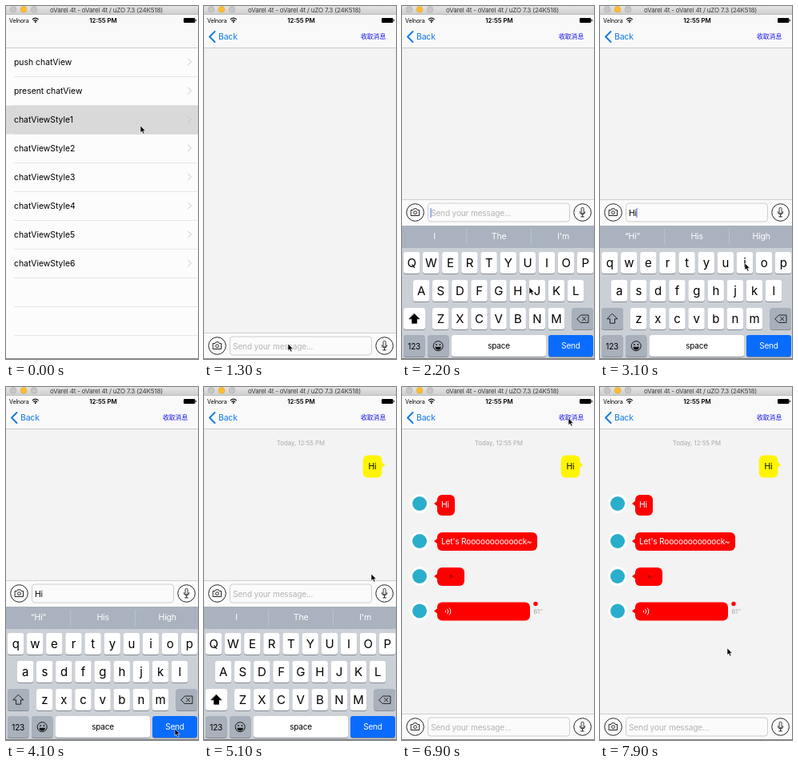
An HTML page that plays this animation: 240 px wide and 442 px high, repeating every 8000 ms.

```html
<!DOCTYPE html>
<html lang="en">
<head>
<meta charset="utf-8">
<title>Chat view demo</title>
<style>
  html, body { margin: 0; width: 100%; height: 100%; overflow: hidden; background: #f3f3f3; }
  svg { display: block; width: 240px; height: 442px; }
  text { font: 10.4px Inter, Roboto, sans-serif; letter-spacing: -.02em; white-space: pre; }
  .wide text { letter-spacing: 0; }
  .bold text { font-weight: 600; }
  .mid { text-anchor: middle; }
  .line { fill: none; stroke: #222; stroke-width: 1; stroke-linecap: round; stroke-linejoin: round; }
</style>
</head>
<body>
<svg id="stage" viewBox="0 0 240 442"></svg>
<script>
const SEND_AT = 4400, REPLY_AT = 6400, LOOP = 8000;
const stage = document.getElementById('stage');
const $ = id => document.getElementById(id);

const rect = (x, y, w, h, fill, r = 0, extra = '') =>
  `<rect x="${x}" y="${y}" width="${w}" height="${h}" rx="${r}" fill="${fill}" ${extra}/>`;
const text = (x, y, str, fill = '#000', size = 10.4, extra = '') =>
  `<text x="${x}" y="${y}" fill="${fill}" style="font-size:${size}px" ${extra}>${str}</text>`;
const mid = (x, y, str, fill, size, extra = '') => text(x, y, str, fill, size, 'class="mid" ' + extra);
const line = (d, extra = '') => `<path class="line" d="${d}" ${extra}/>`;
const circle = (x, y, r, fill, extra = '') => `<circle cx="${x}" cy="${y}" r="${r}" fill="${fill}" ${extra}/>`;
const group = (cls, body) => `<g class="${cls}">${body}</g>`;

function listPage() {
  const names = ['push chatView', 'present chatView'];
  for (let i = 1; i <= 6; i++) names.push('chatViewStyle' + i);
  let s = rect(0, 52, 240, 390, '#fcfcfc') + rect(0, 124.5, 240, 36, '#d9d9d9');
  for (let i = 0; i < 10; i++) {
    const y = 52.5 + 36 * i;
    s += rect(10, y + 35.7, 230, .6, '#d8d8da');
    if (names[i]) {
      s += text(10, y + 21.7, names[i]);
      s += line(`M227.5 ${y + 13.5}l4 4l-4 4`, 'style="stroke:#c4c4c8"');
    }
  }
  return s;
}

function bubble(x, y, w, h, fill, right) {
  const tail = right
    ? `M${x + w - 1} ${y + 8}l5 4l-5 4z`
    : `M${x + 1} ${y + 7}l-5 4l5 4z`;
  return rect(x, y, w, h, fill, 6) + `<path d="${tail}" fill="${fill}"/>`;
}

function messages() {
  const sent = group('wide', mid(121, 72.5, 'Today, 12:55 PM', '#a9a9a9', 7.8)) +
    bubble(198.7, 85.6, 23.6, 27.8, '#fff500', true) + mid(210.5, 103.3, 'Hi');
  const boxes = [[135, 22, 26], [182, 125, 23], [226, 34, 23], [269.5, 116, 23]];
  let reply = '';
  for (const [y, w, h] of boxes)
    reply += circle(22, y + 11, 12, '#fff') + circle(22, y + 11, 9, '#2aaecb') + bubble(44, y, w, h, '#f00');
  reply += text(49, 151.3, 'Hi', '#fff') +
    text(49, 197, `Let's R${'o'.repeat(11)}ck~`, '#fff', 10.2) +
    '<path d="M60 234.5l4.5 3l-4.5 3z" fill="#b30000"/>' +
    line('M54.5 280a1.5 1.5 0 0 1 0 2M56.8 278.3a4 4 0 0 1 0 5.4M59.3 276.8a6 6 0 0 1 0 8.4', 'style="stroke:#fff"') +
    circle(167, 271.5, 2.7, '#f00') + text(164.5, 284, "61''", '#a5a5a5', 7.6);
  return `<g id="sent">${sent}</g><g id="reply">${reply}</g>`;
}

function inputBar() {
  const ring = x => circle(x, 425.5, 10.8, '#fcfcfc', 'stroke="#222"');
  return rect(0, 409.5, 240, 33, '#fafafa') + rect(0, 409, 240, .8, '#c6c6c6') +
    ring(16.5) + line('M11.5 422.5h2.3l1-1.7h3.4l1 1.7h2.3v7h-10z') + circle(16.5, 425.7, 1.9, 'none', 'stroke="#222"') +
    ring(225.6) + rect(224.1, 419.3, 3, 7.4, 'none', 1.5, 'stroke="#222" stroke-width=".9"') +
    line('M222.4 424.7a3.2 3.2 0 0 0 6.4 0M225.6 428.2v2.4M223.8 430.9h3.6') +
    rect(32.5, 414, 177, 23, '#fbfbfb', 3.5, 'stroke="#cdcdcd"') +
    text(36, 429.5, 'Send your message...', '#b4b4b8', 10.2, 'id="hint"') +
    text(36, 429.5, '', '#000', 10.4, 'id="typed"') +
    rect(35.5, 420, 1, 12, '#4a72d8', 0, 'id="caret"');
}

function keyboard() {
  const key = (x, y, w, fill, extra) =>
    rect(x, y + 1, w, 27, '#868b92', 3.2) + rect(x, y, w, 27, fill, 3.2, extra);
  const grey = '#a8b0bb';
  let s = rect(0, 442, 240, 170, '#cbd0d7') + rect(0, 442, 240, 28, '#a9b2be');
  for (let i = 0; i < 3; i++) {
    s += mid(40.5 + 80.6 * i, 458.6, '', '#fff', 10.6, `id="word${i}"`);
    if (i) s += rect(80.5 * i, 446, .7, 20, '#c3c9d1');
  }
  ['QWERTYUIOP', 'ASDFGHJKL', 'ZXCVBNM'].forEach((row, r) => {
    const y = 475 + 35 * r, left = [12.1, 24.1, 48.2][r];
    [...row].forEach((c, i) => {
      const x = left + 24.12 * i;
      s += key(x - 10.2, y, 20.4, '#fff') + mid(x, y + 19, c, '#000', 15, 'data-key');
    });
  });
  const arrow = 'M15.5 552.5l6.3 6.3h-3.3v5.4h-6v-5.4h-3.3z';
  s += key(2, 545, 27, '#fff', 'id="shift"') + line(arrow, 'id="arrow"') +
    key(212.5, 545, 26.5, grey) + line('M219 558.7l4.5-4.7h9.5v9.4h-9.5zM225.5 556.5l4.4 4.4M229.9 556.5l-4.4 4.4') +
    key(2, 579, 26.5, grey) + mid(15.2, 596.5, '123', '#000', 10) +
    key(32, 579, 26.5, grey) + circle(45.2, 592.7, 6, 'none', 'stroke="#111"') +
    circle(43, 591, .9, '#111') + circle(47.4, 591, .9, '#111') +
    '<path d="M41.5 593.7h7.4a3.7 3.7 0 0 1-7.4 0z" fill="#111"/>' +
    key(62, 579, 118, '#fff') + mid(121, 596.3, 'space', '#000', 10) +
    key(183, 579, 56, '#0a6cff') + mid(211, 596.3, 'Send', '#fff', 10);
  return s;
}

function chrome() {
  let s = rect(0, 0, 240, 53, '#f9f9f9') + rect(0, 52, 240, .8, '#bdbdbf') +
    rect(0, 0, 240, 10.5, 'url(#bar)') + rect(0, 10, 240, .8, '#b4b4b4');
  ['#c6c6c6', '#fdbd2e', '#c6c6c6'].forEach((c, i) => s += circle(9 + 13 * i, 4.3, 4, c, 'stroke="#0002" stroke-width=".6"'));
  s += mid(125.5, 7.7, 'oVarel 4t - oVarel 4t / uZO 7.3 (24K518)', '#3c3c3c', 8) +
    text(4, 20.7, 'Velnora', '#000', 7.1) +
    line('M33.3 16.6a5 5 0 0 1 7 0M34.8 18.4a3 3 0 0 1 4 0', 'style="stroke:#000;stroke-width:1.2"') + circle(36.8, 20, 1, '#000') +
    group('wide bold', mid(121.5, 20.8, '12:55 PM', '#000', 7.8)) +
    rect(222, 15, 14.3, 6, '#000', 1.2) + rect(236.8, 16.8, 1, 2.4, '#000');
  s += '<g id="back">' + line('M13.5 32l-6.5 6.5l6.5 6.5', 'style="stroke:#1079e6;stroke-width:1.9"') +
    text(18, 42.4, 'Back', '#1079e6', 10.5, 'id="backLabel"') + '</g>' +
    `<text id="receive" x="196" y="41.4" fill="#1010e8" style="font:7.8px 'Noto Sans CJK SC','Noto Sans CJK',sans-serif;letter-spacing:0">收取消息</text>`;
  return s;
}

stage.innerHTML =
  '<defs><linearGradient id="bar" x2="0" y2="1"><stop stop-color="#e4e4e4"/><stop offset="1" stop-color="#cecece"/></linearGradient></defs>' +
  `<g id="list" class="wide">${listPage()}</g>` + rect(0, 52, 240, 390, '#000', 0, 'id="dim"') +
  `<g id="chat">${rect(0, 52, 240, 390, '#f3f3f3')}${messages()}<g id="dock">${inputBar()}${keyboard()}</g></g>` +
  chrome() + rect(0, 441.2, 240, .8, '#666') +
  '<path id="cursor" d="M0 0v8.6l2-1.8l1.5 3.3l1.6-.7l-1.5-3.2h2.7z" fill="#000" stroke="#fff" stroke-width=".6"/>';

// time, x, y of the pointer tip
const route = [
  [0, 168, 150], [700, 168, 150], [1200, 105, 423], [1700, 105, 423], [2200, 159, 352],
  [2400, 146, 356], [2700, 146, 356], [3000, 181, 322], [3300, 181, 322], [4000, 211, 428],
  [4500, 211, 428], [5100, 209, 234], [5900, 208, 39], [7000, 208, 39], [7800, 159, 327], [LOOP, 159, 327]
];

const clamp = p => Math.max(0, Math.min(1, p));
const easeOut = (t, start, len) => 1 - (1 - clamp((t - start) / len)) ** 3;
const show = (id, on) => $(id).setAttribute('opacity', +on);
const move = (id, x, y) => $(id).setAttribute('transform', `translate(${x} ${y})`);

function pointer(t) {
  const i = route.findIndex(k => k[0] > t);
  const [t0, x0, y0] = route[i - 1], [t1, x1, y1] = route[i];
  const p = (t - t0) / (t1 - t0), e = p * p * (3 - 2 * p);
  return [x0 + (x1 - x0) * e, y0 + (y1 - y0) * e];
}

function draw(t) {
  const push = easeOut(t, 50, 550);
  move('list', -72 * push, 0);
  move('chat', 240 * (1 - push), 0);
  show('dim', .1 * push);
  show('back', push);
  show('receive', push);
  move('backLabel', 80 * (1 - push), 0);

  const open = easeOut(t, 1664, 400) - easeOut(t, 5964, 400);
  move('dock', 0, -167 * open);

  const typed = t < 2600 || t >= SEND_AT ? '' : t < 3100 ? 'H' : 'Hi';
  const upper = !typed;
  $('typed').textContent = typed;
  show('hint', upper);
  const lastEdit = [SEND_AT, 3100, 2600, 1700].find(k => t >= k);
  show('caret', t >= 1700 && t < 5964 && (t - lastEdit) % 1060 < 560);
  move('caret', [0, 7.5, 10][typed.length], 0);

  const words = typed === 'Hi' ? ['“Hi”', 'His', 'High'] : ['I', 'The', "I'm"];
  words.forEach((w, i) => $('word' + i).textContent = w);
  for (const k of stage.querySelectorAll('[data-key]'))
    k.textContent = upper ? k.textContent.toUpperCase() : k.textContent.toLowerCase();
  $('shift').setAttribute('fill', upper ? '#fff' : '#a8b0bb');
  $('arrow').style.fill = upper ? '#000' : 'none';

  show('sent', t >= SEND_AT);
  show('reply', t >= REPLY_AT);
  move('cursor', ...pointer(t));
}

const start = performance.now();
function tick() {
  const t = (performance.now() - start) % LOOP;
  draw(Math.floor(t / 100) * 100);
  requestAnimationFrame(tick);
}
tick();
</script>
</body>
</html>
```
